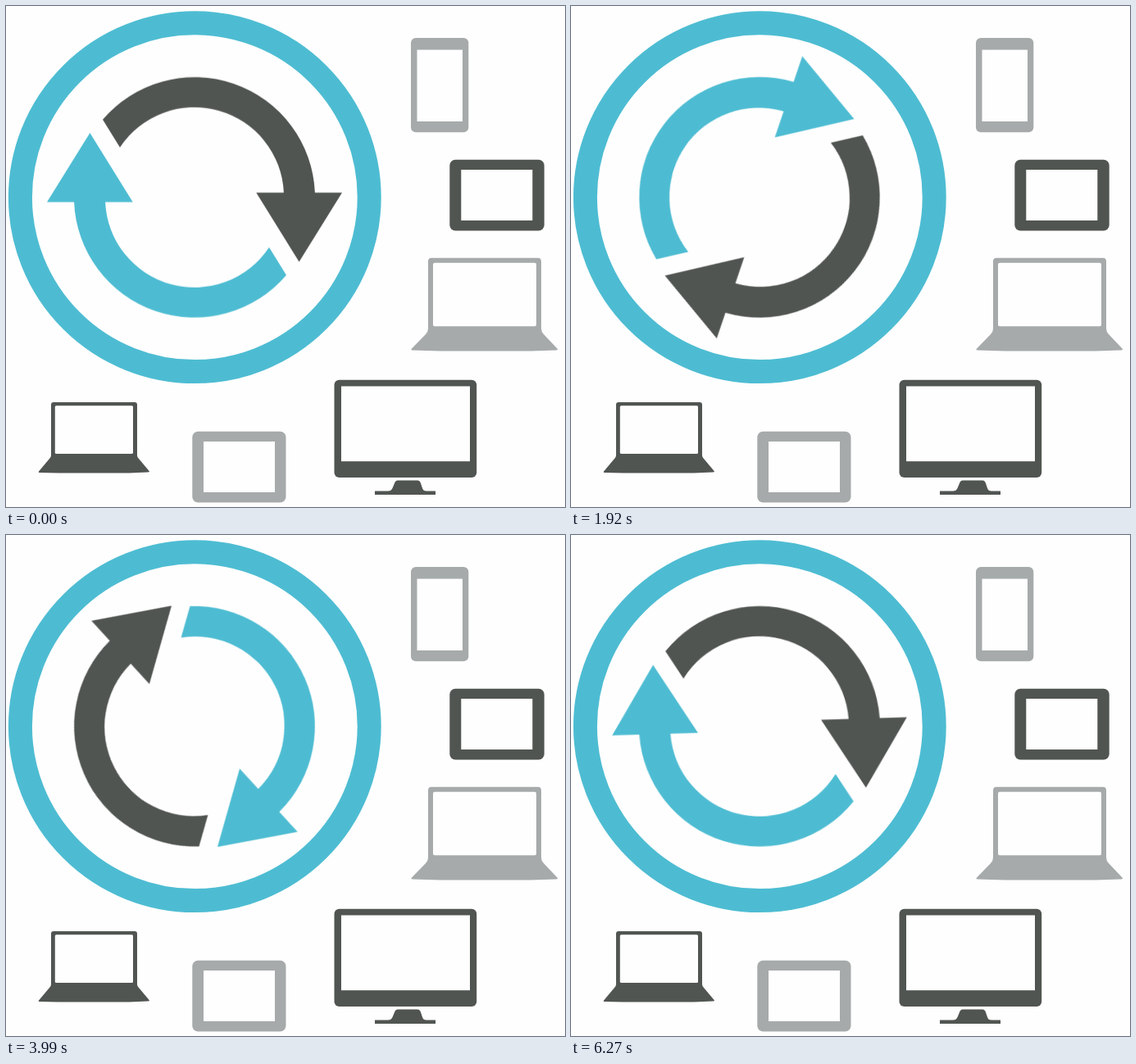
Write an HTML page that moves like this. It is 682 by 612 pixels and loops after 6300 ms.

```html
<!DOCTYPE html>
<html lang="en">
<head>
<meta charset="utf-8">
<title>Device sync</title>
<style>
  html, body { margin: 0; width: 100%; height: 100%; overflow: hidden; background: #fefefe; }
  svg { display: block; width: 682px; height: 612px; }
  .blue { fill: #4dbcd2; }
  .dark { fill: #515551; }
  .gray { fill: #a6aaaa; }
  .screen { fill: #fefefe; }
  .ring { fill: none; stroke: #4dbcd2; stroke-width: 29; }
</style>
</head>
<body>
<svg viewBox="0 0 682 612">
  <defs>
    <path id="arrow" d="M-112-95A147 147 0 0 1 146.9-5.7H180L127.6 78.7 75.3-5.7H108.9A109 109 0 0 0-91-61Z"/>
  </defs>

  <circle class="ring" cx="230.3" cy="233.7" r="212.9"/>
  <g transform="translate(230 233.7)">
    <g id="spinner">
      <use href="#arrow" class="dark"/>
      <use href="#arrow" class="blue" transform="rotate(180)"/>
    </g>
  </g>

  <!-- phone -->
  <rect class="gray" x="494" y="39" width="70.3" height="115.2" rx="6"/>
  <rect class="screen" x="501.5" y="53.5" width="55.5" height="87.5"/>

  <!-- tablets -->
  <rect class="dark" x="541.3" y="187.7" width="115.4" height="86.8" rx="7"/>
  <rect class="screen" x="555.3" y="200" width="87" height="62"/>
  <rect class="gray" x="227.3" y="519.7" width="114.2" height="86.8" rx="7"/>
  <rect class="screen" x="241" y="532" width="87" height="62"/>

  <!-- large laptop -->
  <path class="gray" d="M515 312Q515 307.7 519 307.7H649Q653 307.7 653 312V394Q653 398 656 401L673 419Q673 420.5 670 420.5L640 421.5H530L496 420.5Q493.500 420.500 495 418.500L512 401Q515 398 515 394Z"/>
  <rect class="screen" x="521" y="313.700" width="126" height="77.600" rx="2"/>

  <!-- monitor -->
  <rect class="dark" x="400.500" y="456.700" width="173.700" height="119.300" rx="6"/>
  <rect class="screen" x="409" y="464.500" width="157" height="91.700"/>
  <path class="dark" d="M478 579.500H502Q505 579.500 506 583L508 589Q509 592.500 513 592.500H524V597H450V592.500H466Q470 592.500 471.500 589L474 583Q475 579.500 478 579.500Z"/>

  <!-- small laptop -->
  <path class="dark" d="M55 487Q55 484 58 484H157Q160 484 160 487V549Q160 551 162 553L175 568.500Q175 569.500 173 569.500L150 570.500H64L41 570Q39 570 40 568.500L53 553Q55 551 55 549Z"/>
  <rect class="screen" x="59.800" y="488.300" width="95.200" height="58.700" rx="1.500"/>
</svg>
<script>
  const LOOP = 6300;
  const TICKS = 210;
  const STEP = 360 / 212;

  // [first tick, last tick, turn steps already made]; one step is skipped between runs
  const runs = [[0, 100, 0], [100, 200, 101], [200, 210, 202]];

  const key = (tick, turns, easing) => ({
    offset: tick / TICKS,
    transform: `rotate(${turns * STEP}deg)`,
    easing
  });

  const frames = runs.flatMap(([from, to, turns]) => {
    const count = to - from;
    return [key(from, turns, `steps(${count}, end)`), key(to, turns + count, "linear")];
  });

  document.getElementById("spinner").animate(frames, {
    duration: LOOP,
    iterations: Infinity,
    delay: -1
  });
</script>
</body>
</html>
```
